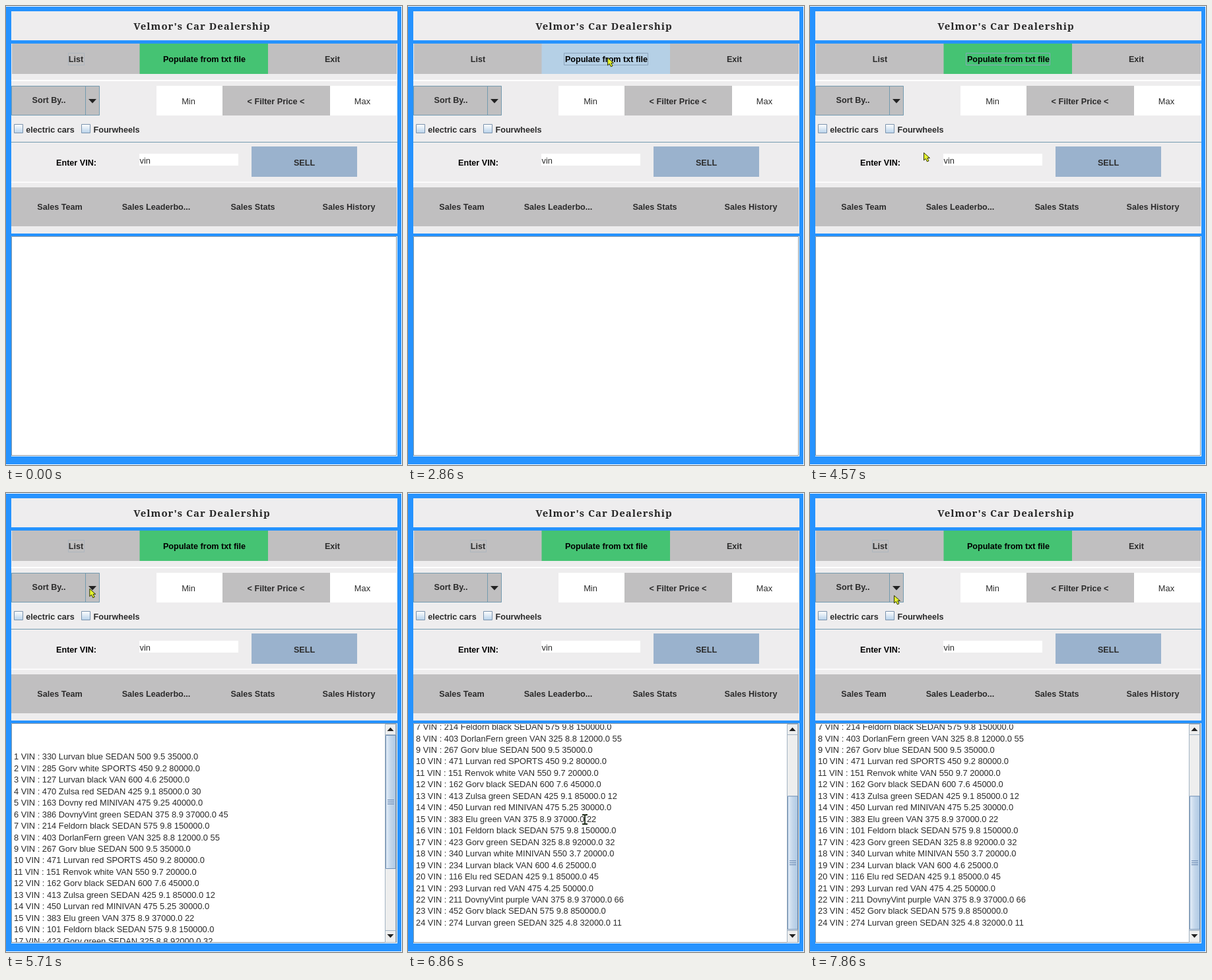
Write an HTML page that moves like this. It is 600 px wide and 696 px high and loops after 8000 ms.

```html
<!DOCTYPE html>
<html lang="en">
<head>
<meta charset="utf-8">
<title>Car dealership</title>
<style>
html, body { margin: 0; width: 100%; height: 100%; overflow: hidden; background: #fff; }
svg { display: block; width: 600px; height: 696px; }
text { font: 12.85px "Liberation Sans", Arial, sans-serif; fill: #2b2b2b; white-space: pre; }
.b { font-weight: bold; font-size: 12.6px; text-anchor: middle; }
.m { text-anchor: middle; }
.k { fill: #000; }
.title { font: bold 15px "Noto Serif", serif; letter-spacing: 1px; text-anchor: middle; fill: #262626; }
.focus { fill: none; stroke: #8ba3ba; }
</style>
</head>
<body>
<svg viewBox="0 0 600 696">
  <defs>
    <linearGradient id="box" x2="0" y2="1"><stop stop-color="#fff"/><stop offset="1" stop-color="#b8d2ea"/></linearGradient>
    <linearGradient id="bar"><stop stop-color="#e4eef8"/><stop offset=".5" stop-color="#c3d6ea"/><stop offset="1" stop-color="#afc9e4"/></linearGradient>
    <clipPath id="view"><path d="M9 351H574V681H9z"/></clipPath>
  </defs>
  <path fill="#2693ff" d="M0 1H599V695H0z"/>
  <path fill="#eeedee" d="M8 8H593V52H8zM8 57H593V345H8z"/>
  <text class="title" x="297" y="36">Velmor's Car Dealership</text>

  <path fill="#c0bfc0" d="M9 57H592V103H9zM8 121H142V166H8zM328 121H491V166H328zM8 275H592V334H8z"/>
  <path id="listBtn" d="M9 57H202V103H9z"/>
  <path id="fillBtn" d="M202.500 57H397V103H202.500z"/>
  <path fill="#fff" d="M8 112H593V114H8zM8 266.500H593V268H8zM228 121H328V166H228zM491 121H592V166H491zM202 224H352V242H202z"/>
  <path fill="#9ab2cd" d="M372 213H532V259H372z"/>
  <path fill="none" stroke="#739ab0" d="M8.500 121.500H141.500V165.500H8.500zM120.500 122V165M8 206.500H593"/>
  <path fill="#222" d="M125 141H137L131 147.500z"/>
  <path fill="url(#box)" stroke="#7b93ad" d="M12.500 179.500H25.500V192.500H12.500zM114.500 179.500H127.500V192.500H114.500z"/>

  <text class="b" x="106" y="85">List</text>
  <text class="b k" x="300.500" y="85">Populate from txt file</text>
  <text class="b" x="494.500" y="85">Exit</text>
  <text class="b" x="65" y="147">Sort By..</text>
  <text class="m" x="276.500" y="149">Min</text>
  <text class="b" x="409" y="149">&lt; Filter Price &lt;</text>
  <text class="m" x="540" y="149">Max</text>
  <text class="b" x="67" y="192">electric cars</text>
  <text class="b" x="167.500" y="192">Fourwheels</text>
  <text class="b k" x="106.500" y="242">Enter VIN:</text>
  <text x="202.500" y="238.500">vin</text>
  <text class="b" x="452" y="242">SELL</text>
  <text class="b" x="81.500" y="309">Sales Team</text>
  <text class="b" x="227.500" y="309">Sales Leaderbo...</text>
  <text class="b" x="374" y="309">Sales Stats</text>
  <text class="b" x="519.500" y="309">Sales History</text>
  <path id="listFocus" class="focus" opacity=".35" d="M94.500 71.500H118.500V89.500H94.500z"/>
  <path id="fillFocus" class="focus" d="M236.500 71.500H363.500V89.500H236.500z"/>

  <path fill="#fff" d="M8 349H593V683H8z"/>
  <path fill="none" stroke="#8795a3" d="M8.500 682V349.500H591.500V681.500H8.500"/>
  <g id="results">
    <g clip-path="url(#view)"><g id="rows"></g></g>
    <path fill="#eee" stroke="#a3b3c3" d="M574.500 350.500H590.500V681.500H574.500zM574.500 366.500H590.500M574.500 663.500H590.500"/>
    <path fill="#222" d="M577.500 361H587.500L582.500 355.500zM577.500 669H587.500L582.500 674.500z"/>
    <g id="thumb">
      <path fill="url(#bar)" stroke="#6f8fb5" d="M575.500 .5H590.500V202.500H575.500z"/>
      <path stroke="#6382ad" d="M578 98.500H588M578 101.500H588M578 104.500H588"/>
    </g>
  </g>
  <path id="arrow" fill="#e6f52e" stroke="#2e3408" stroke-linejoin="round" d="M.5 .5V12L3.300 9.500 5.500 14 8 12.800 5.800 8.500H9.500z"/>
  <path id="beam" fill="none" stroke="#1c2a18" stroke-width="1.800" d="M-4 -7H-1L0 -6 1 -7H4M0 -6V6M-4 7H-1L0 6 1 7H4"/>
</svg>
<script>
const $ = id => document.getElementById(id);
const STEP = 1000 / 7, LOOP = 8000;

const cars = `330 Lurvan blue SEDAN 500 9.5 35000.0
285 Gorv white SPORTS 450 9.2 80000.0
127 Lurvan black VAN 600 4.6 25000.0
470 Zulsa red SEDAN 425 9.1 85000.0 30
163 Dovny red MINIVAN 475 9.25 40000.0
386 DovnyVint green SEDAN 375 8.9 37000.0 45
214 Feldorn black SEDAN 575 9.8 150000.0
403 DorlanFern green VAN 325 8.8 12000.0 55
267 Gorv blue SEDAN 500 9.5 35000.0
471 Lurvan red SPORTS 450 9.2 80000.0
151 Renvok white VAN 550 9.7 20000.0
162 Gorv black SEDAN 600 7.6 45000.0
413 Zulsa green SEDAN 425 9.1 85000.0 12
450 Lurvan red MINIVAN 475 5.25 30000.0
383 Elu green VAN 375 8.9 37000.0 22
101 Feldorn black SEDAN 575 9.8 150000.0
423 Gorv green SEDAN 325 8.8 92000.0 32
340 Lurvan white MINIVAN 550 3.7 20000.0
234 Lurvan black VAN 600 4.6 25000.0
116 Elu red SEDAN 425 9.1 85000.0 45
293 Lurvan red VAN 475 4.25 50000.0
211 DovnyVint purple VAN 375 8.9 37000.0 66
452 Gorv black SEDAN 575 9.8 850000.0
274 Lurvan green SEDAN 325 4.8 32000.0 11`.split("\n");

$("rows").innerHTML = cars.map((car, i) =>
  `<text x="12" y="${404.3 + i * 17.46}">${i + 1} VIN : ${car}</text>`).join("");

// [step, x, y] of the pointer and [step, offset] of the wheel scroll
const path = [[17, 330, 290], [20, 302, 78], [25, 302, 78], [32, 172, 222],
  [36, 100, 80], [39, 100, 80], [43, 268, 495], [51, 268, 495], [55, 127, 155]];
const scrolls = [[0, 0], [44, 50], [45, 99.5], [46, 146.5], [48, 150], [50, 99.5], [51, 150]];

function pointer(n) {
  const i = path.findIndex(p => p[0] >= n);
  if (i < 0) return path.at(-1).slice(1);
  if (i === 0) return path[0].slice(1);
  const [n0, x0, y0] = path[i - 1], [n1, x1, y1] = path[i];
  const u = (n - n0) / (n1 - n0), e = u * u * (3 - 2 * u);
  return [x0 + (x1 - x0) * e, y0 + (y1 - y0) * e];
}

const show = (id, on) => $(id).style.display = on ? "" : "none";
const move = (id, x, y) => $(id).setAttribute("transform", `translate(${x} ${y})`);

function draw(now) {
  // The screen refreshes seven times a second
  const n = Math.min(55, Math.floor((now % LOOP + 5) / STEP));
  const [x, y] = pointer(n);
  const scroll = scrolls.findLast(s => s[0] <= n)[1];
  const inList = y > 350, fillFocused = n >= 20 && n < 35;

  $("fillBtn").setAttribute("fill", n === 20 ? "#b5d0e6" : "#45c373");
  $("listBtn").setAttribute("fill", n === 35 ? "#b5d0e6" : "#c0bfc0");
  show("fillFocus", fillFocused);
  show("listFocus", !fillFocused);
  show("results", n >= 39);
  move("rows", 0, -scroll);
  move("thumb", 0, 367 + scroll * .615);
  show("arrow", n >= 17 && !inList);
  show("beam", inList);
  move("arrow", x, y);
  move("beam", x, y);
}

function tick() {
  draw(performance.now());
  requestAnimationFrame(tick);
}
tick();
</script>
</body>
</html>
```
